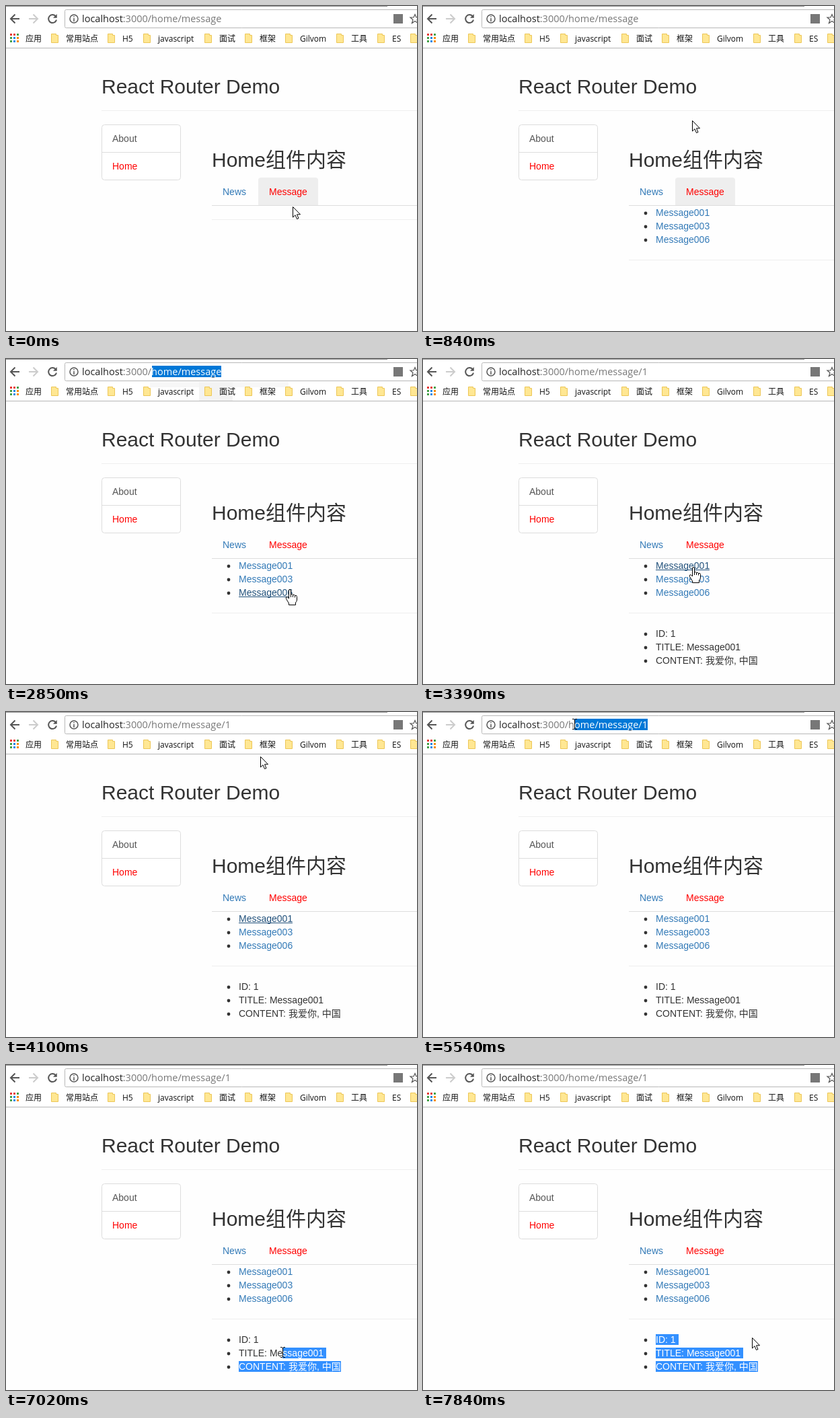
An HTML page with a canvas that plays this animation: 611x483 px, repeating every 8 s.

```html
<!DOCTYPE html>
<html lang="zh-CN">
<head>
<meta charset="utf-8">
<style>
html, body { margin: 0; width: 100%; height: 100%; overflow: hidden; background: #fefefe; }
canvas { display: block; }
</style>
</head>
<body>
<canvas id="stage" width="611" height="483"></canvas>
<script>
const ctx = document.getElementById('stage').getContext('2d');
const LOOP = 8000;
const PAGE = '"Liberation Sans", "Noto Sans CJK SC", "Noto Sans CJK", sans-serif';
const CHROME = '"Open Sans", "Noto Sans CJK SC", "Noto Sans CJK", sans-serif';
const LINK = '#337ab7', INK = '#333', RED = '#f00';

// Bursts of screen updates: start, end, number of steps.
const bursts = [[150, 1140, 8], [1270, 1830, 5], [2330, 3240, 8], [3390, 3540, 2], [3810, 4840, 8],
  [4990, 5140, 2], [5410, 6320, 8], [6470, 7290, 7], [7700, 7840, 2]];

// Pointer route: time, x, y.
const route = [[0, 426, 298], [574, 426, 298], [857, 400, 170], [1000, 335, 45], [1140, 325, 22],
  [1270, 320, 20], [1830, 217, 14], [2200, 217, 14], [2850, 422, 342], [3240, 402, 309], [3663, 402, 309],
  [4104, 378, 66], [4251, 345, 20], [4398, 335, 18], [4840, 279, 18], [5140, 247, 18], [5540, 225, 18],
  [5670, 217, 18], [6320, 498, 426], [6607, 519, 453], [6743, 505, 449], [7290, 318, 405],
  [7560, 318, 405], [7840, 489, 405]];

const LIST_SHOWN = 290, TAB_LEFT = 1270, OPENED = 3390, URL_CLICK = 4398, TEXT_DRAG = 6743;

function snap(t) {
  let time = 0;
  for (const [start, end, count] of bursts) {
    if (t < start) break;
    const gap = (end - start) / (count - 1);
    time = start + gap * Math.min(count - 1, Math.floor((t - start) / gap + 0.15));
  }
  return time;
}

function pointer(t) {
  const next = route.findIndex(p => p[0] > t);
  if (next < 0) return route[route.length - 1].slice(1);
  const a = route[next - 1], b = route[next], k = (t - a[0]) / (b[0] - a[0]);
  return [1, 2].map(i => Math.round(a[i] + (b[i] - a[i]) * k));
}

function rect(x, y, w, h, color) {
  ctx.fillStyle = color;
  ctx.fillRect(x, y, w, h);
}

function text(value, x, y, color = INK, size = 14, family = PAGE) {
  ctx.font = `${size}px ${family}`;
  ctx.fillStyle = color;
  ctx.fillText(value, x, y);
}

function path(d, stroke, width = 1, fill) {
  const shape = new Path2D(d);
  if (fill) { ctx.fillStyle = fill; ctx.fill(shape); }
  ctx.strokeStyle = stroke;
  ctx.lineWidth = width;
  ctx.stroke(shape);
}

function box(x, y, w, h, radius, stroke) {
  ctx.beginPath();
  ctx.roundRect(x + 0.5, y + 0.5, w - 1, h - 1, radius);
  ctx.fillStyle = '#fff';
  ctx.fill();
  ctx.strokeStyle = stroke;
  ctx.lineWidth = 1;
  ctx.stroke();
}

function bullet(y) {
  ctx.beginPath();
  ctx.arc(331, y, 2.4, 0, 7);
  ctx.fillStyle = INK;
  ctx.fill();
}

// Paints a highlight and redraws the given text in white inside it.
function highlight(x, y, right, h, color, redraw) {
  if (right <= x) return;
  ctx.save();
  ctx.beginPath();
  ctx.rect(x, y, right - x, h);
  ctx.clip();
  rect(x, y, right - x, h, color);
  redraw('#fff');
  ctx.restore();
}

function addressBar(t) {
  rect(0, 0, 611, 62, '#fff');
  rect(0, 0, 567, 1, '#929292');
  box(87, 5, 540, 28, 2, '#b8b8b8');
  path('M20 19H8M13.5 12.5L7 19L13.5 25.5', '#555', 2);
  path('M34 19H46M40.5 12.5L47 19L40.5 25.5', '#ccc', 2);
  path('M73.6 15A6 6 0 1 0 75 20.5', '#555', 2);
  path('M75.5 12.5V17.5H70.5Z', '#555', 0.5, '#555');
  path('M107 19A6 6 0 1 1 95 19A6 6 0 1 1 107 19M101 18V23M101 15V16.6', '#555', 1.5);
  rect(576, 12, 14, 14, '#777');
  path('M608 12.5L610 17H615L611 20.5L612.5 25.5L608 22.5L603.5 25.5L605 20.5L601 17H606Z', '#555', 1.2);

  const rest = ':3000/home/message' + (t < OPENED ? '' : '/1');
  const url = (host, tail) => {
    text('localhost', 113, 24, host, 14.5, CHROME);
    text(rest, 113 + ctx.measureText('localhost').width, 24, tail, 14.5, CHROME);
  };
  url('#222', '#777');
  const first = t >= 1270 && t < OPENED, second = t >= URL_CLICK && t < TEXT_DRAG;
  if (first || second) {
    const from = Math.max(217, pointer(Math.min(t, first ? 1830 : 5670))[0]);
    highlight(from, 10, first ? 320 : 334, 17, '#0078d7', color => url(color, color));
  }
}

function bookmarks(t) {
  if (t >= 999 && t < 2460) rect(287, 34, 33, 28, '#f1f1f1');
  if (t >= 2460 && t < OPENED) {
    rect(214, 34, 206, 8, '#f7f7f7');
    rect(287, 34, 50, 28, '#f3f3f3');
  }
  if (t >= 5800 && t < TEXT_DRAG) rect(214, 34, 230, 16, '#f1f1f1');

  const dots = ['#e53935', '#e53935', '#43a047', '#43a047', '#1e88e5', '#fb8c00', '#43a047', '#1e88e5', '#fb8c00'];
  dots.forEach((color, i) => rect(6 + i % 3 * 5, 41 + Math.floor(i / 3) * 5, 3, 3, color));
  text('应用', 29, 53, '#111', 12, CHROME);
  const folders = [[67, '常用站点'], [151, 'H5'], [204, 'javascript'], [295, '面试'], [355, '框架'],
    [415, 'Gilvom'], [491, '工具'], [552, 'ES'], [601, '']];
  for (const [x, label] of folders) {
    path(`M${x + .5} 41.5H${x + 7.5}V43.5H${x + 10.5}V54.5H${x + .5}Z`, '#ecc657', 1, '#ffe793');
    text(label, x + 22, 53, '#111', 12, CHROME);
  }
  rect(0, 62, 611, 1, '#b6b6b6');
}

function page(t, [x, y]) {
  text('React Router Demo', 142, 130, INK, 30);
  rect(142, 155, 469, 1, '#eee');
  box(142, 176, 118, 83, 4, '#ddd');
  rect(143, 217, 116, 1, '#ddd');
  text('About', 158, 202, '#555');
  text('Home', 158, 243, RED);
  text('Home组件内容', 306, 239, INK, 30);

  if (t < TAB_LEFT) {
    ctx.beginPath();
    ctx.roundRect(375, 255, 89, 42, [4, 4, 0, 0]);
    ctx.fillStyle = '#eee';
    ctx.fill();
  }
  rect(306, 296, 305, 1, '#ddd');
  text('News', 322, 281, LINK);
  text('Message', 391, 281, RED);

  const listed = t >= LIST_SHOWN;
  rect(306, listed ? 377 : 317, 305, 1, '#eee');
  if (listed) {
    ['Message001', 'Message003', 'Message006'].forEach((label, i) => {
      const base = 312 + i * 20;
      const hovered = overLink(x, y) && Math.abs(y - base + 5) <= 10;
      const focused = i === 0 && t >= OPENED && t < URL_CLICK;
      bullet(base - 4);
      text(label, 346, base, hovered || focused ? '#23527c' : LINK);
      if (hovered || focused) rect(346, base + 1, 80, 1, '#23527c');
    });
  }
  if (t >= OPENED) details(t);
}

function details(t) {
  const lines = [['ID: 1', 380], ['TITLE: Message001', 476], ['CONTENT: 我爱你, 中国', 498]];
  const [x, y] = pointer(t);
  const focus = t >= 7290 ? 0 : Math.max(0, Math.min(2, Math.floor((y - 398) / 20)));
  lines.forEach(([label, right], i) => {
    const base = 413 + i * 20;
    const draw = color => text(label, 346, base, color);
    bullet(base - 4);
    draw(INK);
    if (t < TEXT_DRAG || i < focus) return;
    const from = i > focus || t >= 7290 ? 346 : Math.max(346, x);
    highlight(from, base - 13, right, 16, '#3390ff', draw);
  });
}

function overLink(x, y) {
  return y > 299 && y < 357 && x >= 346 && x <= 426;
}

function drawPointer(t, [x, y]) {
  ctx.save();
  ctx.translate(x, y);
  if (y < 33 || (t >= TEXT_DRAG && t < 7290 && x > 346)) {
    path('M-3 -7.5H-1L.5 -6.5L2 -7.5H4M.5 -6.5V6.5M-3 7.5H-1L.5 6.5L2 7.5H4', '#000');
  } else if (overLink(x, y)) {
    path('M-1.5 14V2Q-1.5 .5 0 .5Q1.5 .5 1.5 2V8Q3.5 6.5 4.5 8.5Q6.5 7.5 7.5 9.5Q10.5 8.5 10.5 11.5V16' +
      'Q10 19 8.5 20V23.5H-1.5V21L-5.5 14.5Q-6.5 11.5 -4 11.5L-1.5 14M1.5 8V12M4.5 8.5V12M7.5 9.5V12.5',
      '#000', 1, '#fff');
  } else {
    path('M.5 .5V16L4 12.7L6.5 18.5L9 17.5L6.5 11.8H11.5Z', '#000', 1, '#fff');
  }
  ctx.restore();
}

function frame(now) {
  const t = snap(now % LOOP);
  const position = pointer(t);
  rect(0, 0, 611, 483, '#fefefe');
  addressBar(t);
  bookmarks(t);
  page(t, position);
  drawPointer(t, position);
  requestAnimationFrame(frame);
}
requestAnimationFrame(frame);
</script>
</body>
</html>
```
